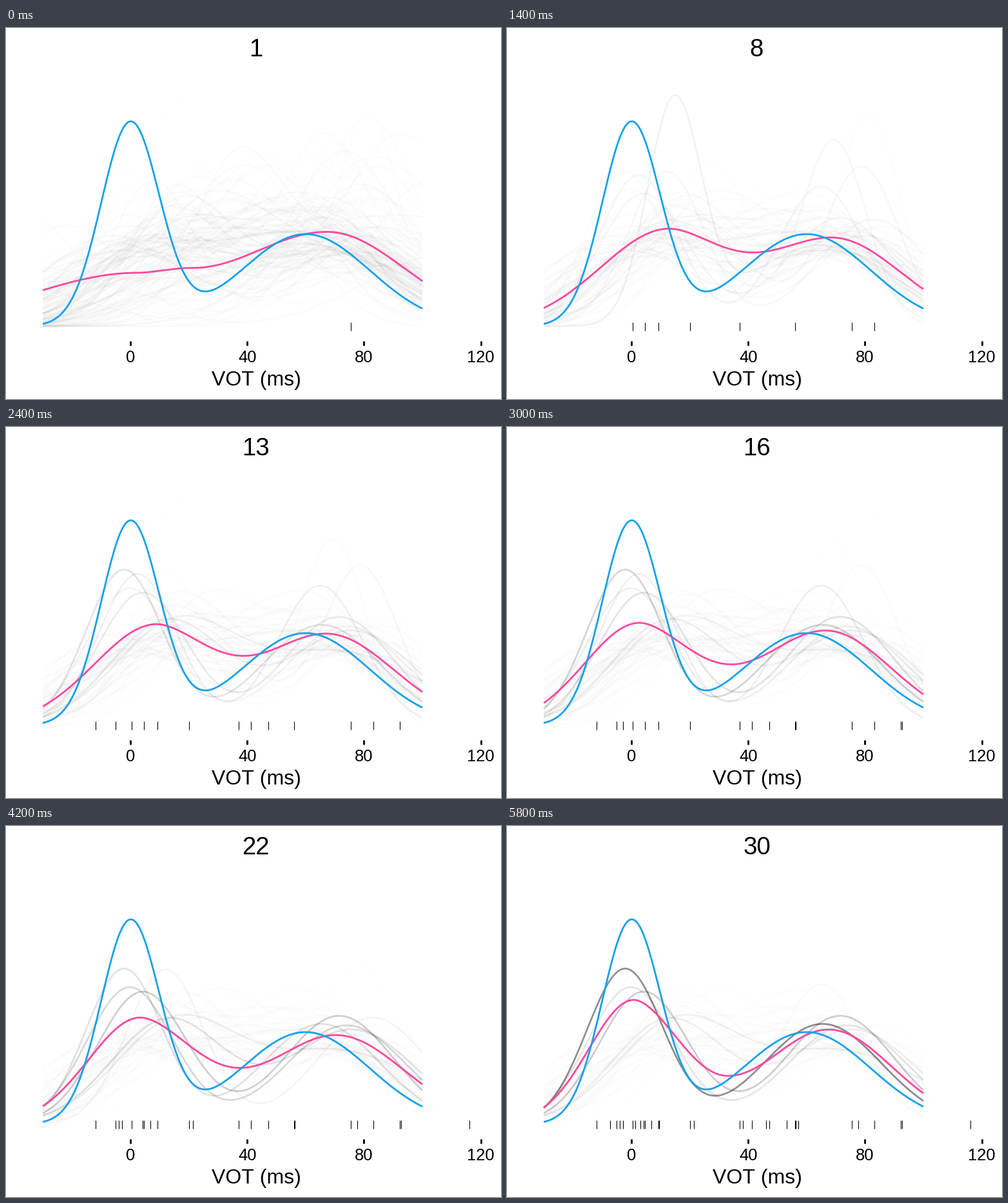
These frames come from a looping animation (768x576 px, 6 s). A matplotlib script:

```python
import numpy as np
import matplotlib.pyplot as plt
from matplotlib.animation import FuncAnimation
from matplotlib.collections import LineCollection

W, H, PX = 768, 576, 0.72
FRAMES, STEP_MS = 30, 200
BASE, X0, X_SCALE, AREA = 463, 193, 4.53, 3146
BLUE, PINK = "#16a2ea", "#fb489f"

plt.rcParams["font.family"] = "Liberation Sans"
plt.rcParams["text.kerning_factor"] = 6  # plain advances, no kerning

vot = np.linspace(-30, 100, 261)
xs = X0 + X_SCALE * vot
rng = np.random.default_rng(7)


def mixture(v, m1, s1, m2, s2):
    """Pixel height of an equal-weight pair of normal densities."""
    bell = lambda m, s: AREA / s * np.exp(-((v - m) ** 2) / (2 * s * s))
    return bell(m1, s1) + bell(m2, s2)


def flank(u, top, end):
    """Half bell falling from top at u=0 to end at u=1."""
    return top * (end / top) ** (u * u)


def ease(u, a, b):
    return a + (b - a) * (1 - np.cos(np.pi * u)) / 2


def two_humps(left, x1, y1, xv, yv, x2, y2, right):
    """Screen curve with two peaks, the valley between them and both ends."""
    left, y1, yv, y2, right = (BASE - y for y in (left, y1, yv, y2, right))
    unit = lambda a, b: np.clip((xs - a) / (b - a), 0, 1)
    height = np.select(
        [xs < x1, xs < xv, xs < x2],
        [flank(unit(x1, xs[0]), y1, left),
         ease(unit(x1, xv) ** 0.88, y1, yv),
         ease(unit(xv, x2), yv, y2)],
        flank(unit(x2, xs[-1]), y2, right))
    return BASE - height


# Key poses of the estimate: left end, peak, valley, peak, right end
poses = {
    1: (407, 205, 380, 290, 372.5, 498, 316.5, 393),
    5: (432.5, 252, 315.5, 381, 350.5, 508, 326.5, 402),
    11: (437, 253, 307.5, 382, 346.5, 498, 324, 409),
    16: (428.5, 206, 304, 348, 368.5, 494, 316, 415),
    19: (434, 210, 298.5, 367, 379, 519, 326.5, 396),
    26: (436, 207, 296, 357, 371, 502, 322, 408),
    30: (437, 197, 270, 343, 388, 499, 316, 415),
}
steps = np.arange(1, FRAMES + 1)
pose_at = np.array([np.interp(steps, list(poses), col)
                    for col in zip(*poses.values())]).T

# Observations (screen x) in order of arrival
rug = np.array([535, 195, 361, 570, 235, 214, 447, 284, 611, 170, 379.5, 139,
                407, 180, 447.5, 613, 211.5, 719, 224, 290, 175, 545, 366,
                452, 198.5, 434, 160, 401.5, 207, 235.5])

# Leading hypotheses: mean and spread of both categories
leaders = [
    (-2.2, 13.05, 65.5, 20.2), (4.2, 15.3, 71.5, 18.7),
    (-0.2, 14.8, 74, 20.5), (15.5, 20.5, 72, 28), (13, 19.3, 76, 21.5),
    (2.5, 13.4, 65, 14.5), (20, 20, 79, 12.8), (14.7, 9.2, 65, 25),
    (12, 13.1, 83, 19), (25.5, 13.2, 75, 25), (31, 17.2, 70, 26),
    (10, 22, 69.5, 11), (35, 25, 82, 10.1),
]
# Their opacity is their posterior weight given the observations so far
data = (rug - X0) / X_SCALE
fit = np.cumsum([np.log(mixture(data, *p)) for p in leaders], axis=1)
weight = np.exp(fit - fit.max(axis=0))
share = 0.86 * (steps / FRAMES) ** 0.8
lead_alpha = share * weight / weight.sum(axis=0)


def sample(n, m1, s1, m2, s2):
    """Random hypotheses: normal means, uniform spreads."""
    return np.column_stack([rng.normal(*m1, n), rng.uniform(*s1, n),
                            rng.normal(*m2, n), rng.uniform(*s2, n)])


def fading(n, start, life):
    return np.outer(rng.uniform(0.5, 1.4, n), start * np.exp(-steps / life))


vague = sample(80, (40, 40), (14, 45), (75, 18), (14, 40))
focused = sample(55, (10, 10), (16, 30), (72, 9), (18, 30))
alpha = np.vstack([lead_alpha, fading(80, 0.015, 3), fading(55, 0.016, 32)])
paths = [np.column_stack([xs, BASE - mixture(vot, *p)])
         for p in [*leaders, *vague, *focused]]

fig = plt.figure(figsize=(W / 100, H / 100), dpi=100, facecolor="white")
ax = fig.add_axes([0, 0, 1, 1])
ax.set(xlim=(0, W), ylim=(H, 0))
ax.axis("off")


def label(x, y, text, size):
    return ax.text(x, y, text, fontsize=size * PX, ha="center", va="baseline")


def stroke(x, y, color, z):
    return ax.plot(x, y, color=color, lw=2.8 * PX, zorder=z,
                   solid_capstyle="butt")[0]


cloud = LineCollection(paths, linewidths=2.7 * PX, zorder=1)
marks = LineCollection([], colors="black", linewidths=1.07 * PX, zorder=2)
ax.add_collection(cloud, autolim=False)
ax.add_collection(marks, autolim=False)
estimate = stroke([], [], PINK, 3)
stroke(xs, BASE - mixture(vot, 0, 10, 60, 22), BLUE, 4)

for v in range(0, 121, 40):
    x = X0 + X_SCALE * v
    stroke([x, x], [485.5, 493], "black", 2)
    label(x, 519, str(v), 25.6)
label(388, 554.5, "VOT (ms)", 32)
title = label(387.5, 44.5, "", 38.4)


def draw(frame):
    rgba = np.zeros((len(paths), 4))
    rgba[:, 3] = alpha[:, frame]
    cloud.set_color(rgba)
    estimate.set_data(xs, two_humps(*pose_at[frame]))
    marks.set_segments([[(x, 457), (x, 469.5)] for x in rug[:frame + 1]])
    title.set_text(str(frame + 1))
    return cloud, estimate, marks, title


anim = FuncAnimation(fig, draw, frames=FRAMES, init_func=lambda: draw(0),
                     interval=STEP_MS, repeat=True, repeat_delay=0)
plt.show()
```
